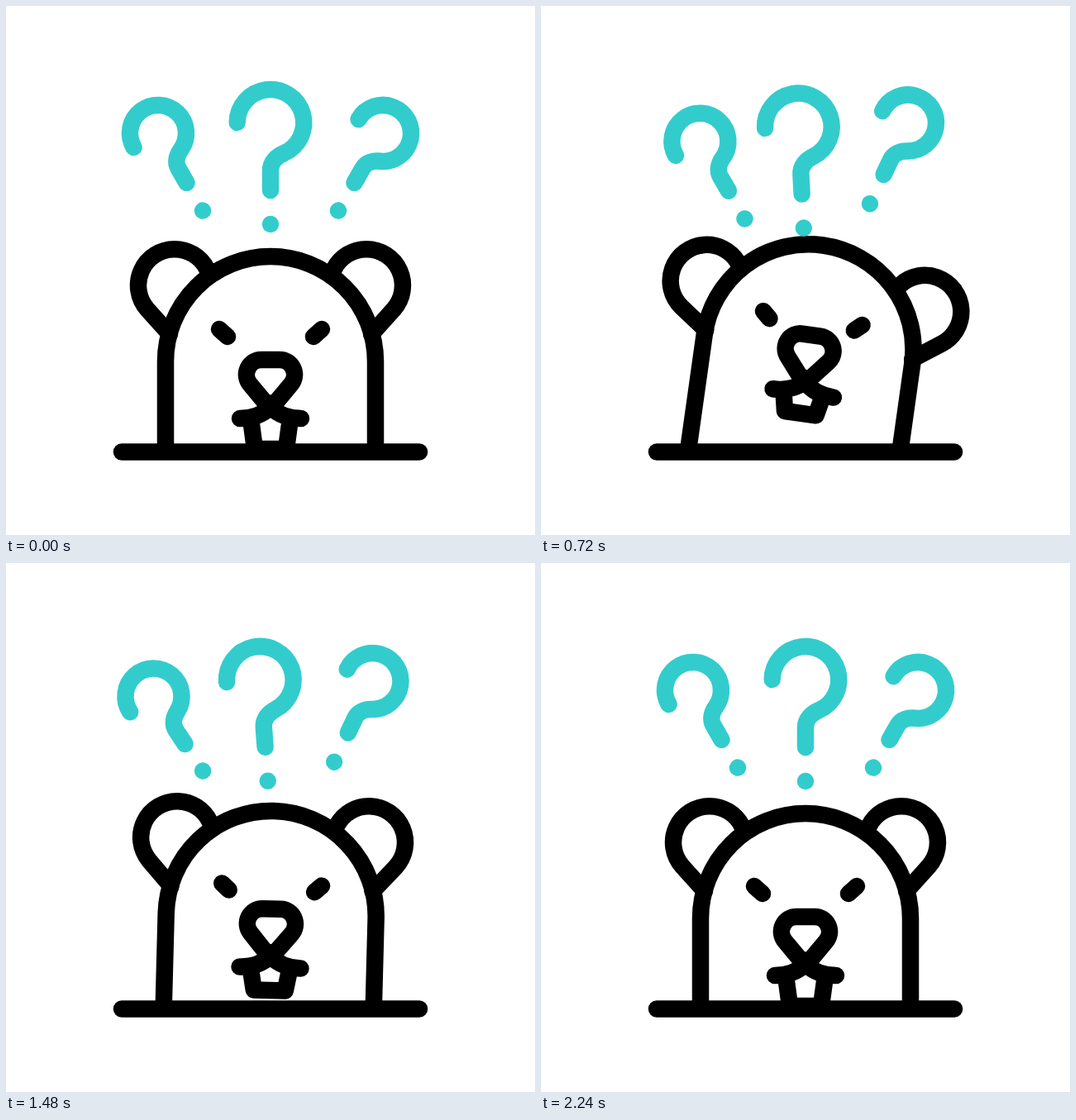
An HTML page for the animation above (3.02 s loop, 640x640 px).

```html
<!DOCTYPE html>
<html lang="en">
<head>
<meta charset="utf-8">
<title>Puzzled bear</title>
<style>
  html, body { margin: 0; width: 100%; height: 100%; overflow: hidden; background: #fff; }
  svg { display: block; width: 100%; height: 100%; }
  .line, .mark { fill: none; stroke: #000; stroke-width: 20.5; stroke-linecap: round; stroke-linejoin: round; }
  .mark { stroke: #3cc; }
  .dot { fill: #3cc; stroke: none; }
</style>
</head>
<body>
<svg viewBox="0 0 640 640">
  <defs>
    <clipPath id="above"><rect width="640" height="540"/></clipPath>
    <path id="ear" d="M247 324L243 318A43.8 43.8 0 0 0 204 294.2A43.8 43.8 0 0 0 171 367L198 397"/>
    <g id="small">
      <path d="M-34 0A34 34 0 1 1 13.8 31C6 34.5 0 41 0 49V69"/>
      <circle class="dot" cy="108" r="10.2"/>
    </g>
  </defs>

  <g class="line" clip-path="url(#above)">
    <g id="head">
      <path d="M193 640V430A127 127 0 0 1 447 430V640"/>
      <g id="earL"><use href="#ear"/></g>
      <g id="earR"><use href="#ear" transform="translate(640) scale(-1 1)"/></g>
      <path id="eyes"/>
      <g id="face">
        <path d="M309 428H331A18 18 0 0 1 344.9 457.5L329.2 476.4A12 12 0 0 1 310.8 476.4L295.1 457.5A18 18 0 0 1 309 428Z"/>
        <path d="M283 499C300 499 311 494 320 485C329 494 340 499 357 499"/>
        <path id="teeth"/>
      </g>
    </g>
  </g>
  <path class="line" d="M140 539.5H500"/>

  <g class="mark">
    <g id="left"><use href="#small" transform="translate(184 154) rotate(-30)"/></g>
    <g id="mid">
      <path d="M279.7 141A40.3 40.3 0 1 1 336.5 178C327 182 320 189 320 199V223"/>
      <circle class="dot" cx="320" cy="264" r="10.2"/>
    </g>
    <g id="right"><use href="#small" transform="translate(456 154) rotate(30)"/></g>
  </g>
</svg>
<script>
const LOOP = 3020;
const $ = id => document.getElementById(id);

// Smooth curve through the keys, flat at every turning point and at both ends.
function curve(times, values) {
  const last = times.length - 1;
  const slope = i => (values[i + 1] - values[i]) / (times[i + 1] - times[i]);
  const tangent = times.map((_, i) => {
    if (i === 0 || i === last) return 0;
    const a = slope(i - 1), b = slope(i);
    return a * b > 0 ? 2 * a * b / (a + b) : 0;
  });
  return t => {
    if (t >= times[last]) return values[last];
    let i = 0;
    while (t >= times[i + 1]) i++;
    const h = times[i + 1] - times[i], u = (t - times[i]) / h, v = 1 - u;
    return v * v * ((1 + 2 * u) * values[i] + u * h * tangent[i])
         + u * u * ((3 - 2 * u) * values[i + 1] - v * h * tangent[i + 1]);
  };
}

const beats = [0, 340, 720, 1200, 1480, 1900];
const track = (end, ...values) => curve([...beats, end], [0, ...values, 0]);

const head = {
  y: track(2100, 29, -15, 0, -3, 1),
  turn: track(2100, -5, 8, -4.8, 1.5, 0),
  ear: track(2100, 3, 12.5, 2, 0, 0),
  noseX: track(2100, .4, 1.2, .5, .5, 0),
  noseY: track(2100, 12, -15.5, 0, -6.5, 0),
  bite: track(2100, 0, -12.5, 4, -9.5, 0),
  squint: track(2100, 1, .2, 1, .2, 0)
};

const leftSlide = curve(
  [0, 340, 440, 540, 720, 1090, 1200, 1480, 1900, 2060],
  [0, -31, -37, -31, 13, -27, -16, 3.5, .5, 0]);

const marks = [
  { id: 'left', px: 259, py: 283,
    x: t => .65 * leftSlide(t), y: t => .76 * leftSlide(t),
    turn: track(2060, -1.8, 0, .5, -3.5, 1) },
  { id: 'mid', px: 320, py: 306,
    x: () => 0,
    y: curve([0, 340, 445, 540, 720, 1100, 1200, 1480, 1900, 2150],
             [0, -24.5, -32, -27.5, 4.5, -17, -12, -.5, 1.5, 0]),
    turn: track(2150, .4, -3, 4.9, -4.4, 2.1) },
  { id: 'right', px: 381, py: 283,
    x: track(2240, 4.5, -1, 2.3, -2, -.9),
    y: curve([0, 340, 480, 720, 1200, 1480, 1900, 2240],
             [0, -10.5, -13, -6.7, 3, -5.3, 5.7, 0]),
    turn: track(2240, 0, -4.8, 8.3, -4.6, 2.2) }
];

const place = (id, x, y, turn, px, py) =>
  $(id).setAttribute('transform', `translate(${x} ${y}) rotate(${turn} ${px} ${py})`);

function eyePath(s) {
  const eye = side => {
    const x = d => 320 + side * d;
    return `M${x(62 - 8 * s)} ${391 + 5 * s}L${x(52 - 1.5 * s)} ${400 - s}`;
  };
  return eye(-1) + eye(1);
}

function draw(t) {
  place('head', 0, head.y(t), head.turn(t), 320, 455);
  place('earL', 0, 0, -head.ear(t), 320, 430);
  place('earR', 0, 0, head.ear(t), 320, 430);
  place('face', head.noseX(t), head.noseY(t), 0, 0, 0);
  $('eyes').setAttribute('d', eyePath(head.squint(t)));
  $('teeth').setAttribute('d', `M296 499L301 ${536 + head.bite(t)}H339L344 499`);
  for (const m of marks) place(m.id, m.x(t), m.y(t), m.turn(t), m.px, m.py);
}

const start = performance.now();
function tick() {
  draw((performance.now() - start) % LOOP);
  requestAnimationFrame(tick);
}
tick();
</script>
</body>
</html>
```
